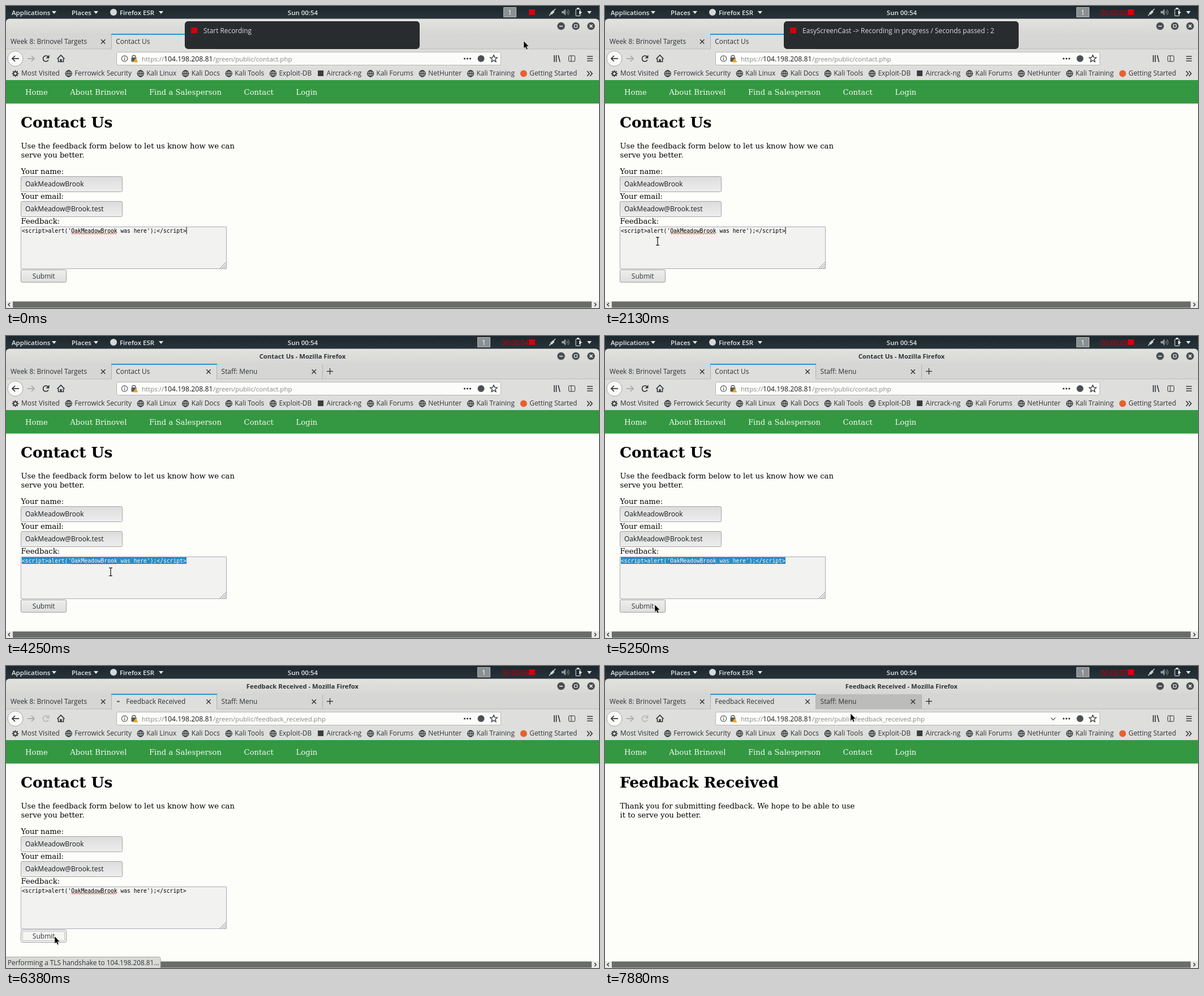
Animation, 1048 px wide and 534 px high, one loop 8000 ms. Source, as an HTML page with a canvas:

```html
<!DOCTYPE html>
<html lang="en">
<head>
<meta charset="utf-8">
<title>Contact form</title>
<style>
html, body { margin: 0; width: 100%; height: 100%; overflow: hidden; background: #fdfdfa; }
canvas { display: block; }
</style>
</head>
<body>
<canvas id="stage" width="1048" height="534"></canvas>
<script>
const c = document.getElementById('stage').getContext('2d');
const W = 1048, H = 534, LOOP = 8000, TICK = 125;
const SANS = '"Open Sans", "Noto Sans", sans-serif';
const SERIF = '"DejaVu Serif", serif';
const MONO = '"DejaVu Sans Mono", monospace';
const INK = '#2e3336', LIGHT = '#e6e9e9', RED = '#d4000c', PALE = '#b4b6b6';
const USER = 'OakMeadowBrook', HOST = '104.198.208.81';

// Ticks of the main events
const SELECT = 24, FADE = 30, CLICK = 44, LOAD = 45, TITLE = 50, DONE = 52, HOVER = 62;

// Pointer stops: tick, x, y
const STOPS = [
  [1, 915, 62], [6, 170, 455], [9, 128, 379], [16, 100, 417], [20, 55, 408], [26, 55, 408],
  [29, 47, 408], [34, 185, 417], [43, 85, 477], [56, 86, 479], [58, 155, 422], [63, 434, 84]
];

const clamp = v => Math.min(1, Math.max(0, v));

// Draws a string and returns its width
function text(s, x, y, { size = 11.9, color = INK, font = SANS, weight = 400, align = 'left' } = {}) {
  c.font = `${weight} ${size}px ${font}`;
  c.fillStyle = color;
  c.textAlign = align;
  c.fillText(s, x, y);
  return c.measureText(s).width;
}

const serif = (s, x, y, color = '#000') => text(s, x, y, { size: 13.2, color, font: SERIF });
const heading = s => text(s, 26, 215, { size: 26.4, color: '#000', font: SERIF, weight: 700 });

function rect(x, y, w, h, fill) {
  c.fillStyle = fill;
  c.fillRect(x, y, w, h);
}

function paint(fill, stroke, width) {
  if (fill) { c.fillStyle = fill; c.fill(); }
  if (stroke) { c.strokeStyle = stroke; c.lineWidth = width; c.stroke(); }
}

function box(x, y, w, h, r, fill, stroke) {
  c.beginPath();
  c.roundRect(x, y, w, h, r);
  paint(fill, stroke, 1);
}

function arc(x, y, r, fill, stroke, width = 1, from = 0, to = Math.PI * 2) {
  c.beginPath();
  c.arc(x, y, r, from, to);
  paint(fill, stroke, width);
}

// Flat x, y lists relative to an anchor
function trace(x, y, p) {
  c.beginPath();
  for (let i = 0; i < p.length; i += 2) c.lineTo(x + p[i], y + p[i + 1]);
}

function line(x, y, p, color = INK, width = 1.6) {
  trace(x, y, p);
  paint(null, color, width);
}

function poly(x, y, p, fill) {
  trace(x, y, p);
  c.closePath();
  paint(fill);
}

function fade(y0, y1, a, b) {
  const g = c.createLinearGradient(0, y0, 0, y1);
  g.addColorStop(0, a);
  g.addColorStop(1, b);
  return g;
}

const triangle = (x, y) => poly(x, y, [-4, -2, 4, -2, 0, 3], LIGHT);
const chevron = (x, y, w, h, color, width) => line(x, y, [-w, -h, w, 0, -w, h], color, width);

function plus(x, y, r, color = INK, width = 1.4) {
  line(x, y, [-r, 0, r, 0], color, width);
  line(x, y, [0, -r, 0, r], color, width);
}

function cross(x, y, r, color = INK, width = 1.4) {
  line(x, y, [-r, -r, r, r], color, width);
  line(x, y, [r, -r, -r, r], color, width);
}

function arrow(x, dir, color) {
  line(x, 93, [-6, 0, 6, 0], color, 1.7);
  chevron(x + 3.5 * dir, 93, 2.5 * dir, 5, color, 1.7);
}

function globe(x, y) {
  arc(x, y, 5.5, null, INK, 1.3);
  c.beginPath();
  c.ellipse(x, y, 2.6, 5.5, 0, 0, Math.PI * 2);
  c.stroke();
  plus(x, y, 5.5, INK, 1);
}

function gear(x, y) {
  plus(x, y, 5.8, INK, 1.8);
  cross(x, y, 4.1, INK, 1.8);
  arc(x, y, 3.2, '#dededc', INK, 1.7);
}

function star(x, y) {
  const p = [];
  for (let i = 0; i <= 10; i++) {
    const a = i * Math.PI / 5 - Math.PI / 2, r = i % 2 ? 3 : 6.6;
    p.push(Math.cos(a) * r, Math.sin(a) * r);
  }
  line(x, y, p, INK, 1.3);
}

function panel(count) {
  rect(0, 0, W, 23, fade(0, 23, '#1c272d', '#28343a'));
  const bar = { size: 11.5, color: LIGHT, weight: 600 };
  text('Applications', 10, 15.5, bar);
  text('Places', 116, 15.5, bar);
  text('Firefox ESR', 201, 15.5, bar);
  text('Sun 00:54', 524.5, 15.5, { ...bar, align: 'center' });
  for (const x of [85, 159, 274, 1031]) triangle(x, 11);
  arc(190, 11, 6, '#d5d9da');

  const x = count ? 833.5 : 879.5;
  box(x, 2.5, 22, 17, 0, '#8b9192', '#b6bbbc');
  text('1', x + 11, 15.5, { color: '#fff', align: 'center' });
  if (count) text('00:00:0' + count, 876, 15.5, { size: 12, color: '#c4000c' });
  rect(924, 6, 11, 10, RED);

  line(965.5, 11, [-5.5, 6, 5.5, -6], '#cfd4d5', 1.6);
  line(965.5, 11, [-2.5, 3, 2.5, -2], '#cfd4d5', 4);
  poly(982, 11, [0, -2, 3, -2, 7, -6, 7, 6, 3, 2, 0, 2], '#8f9799');
  for (const r of [3, 6]) arc(989, 11, r, null, '#7b8487', 1.3, -.9, .9);
  box(1007, 5.5, 8, 12, 1, null, LIGHT);
  rect(1009, 3, 4, 2, LIGHT);
  poly(1013, 11.5, [0, -3.5, 5, 0, 0, 3.5], LIGHT);
}

function tabs(k, name) {
  rect(0, 48, W, 28, '#d6d6d4');
  rect(0, 75.5, W, 1, '#bcbcba');
  rect(187, 50, 185, 27, '#dededc');
  if (k > HOVER) rect(373, 50, 186, 26, '#bcbcba');
  rect(186, 49, 187, 2, '#2a93cf');

  const busy = k >= LOAD && k < DONE;
  if (busy) box(199 + 4 * Math.sin((k - LOAD - 1) * .8), 61.5, 5, 2.5, 1, '#696d6f');
  ['Week 8: Brinovel Targets', name, 'Staff: Menu'].forEach((s, i) => {
    const x = 8 + i * 186.3;
    text(s, x + (busy && i === 1 ? 18 : 0), 67);
    cross(x + 163.7, 63, 3.7);
    rect(Math.round(x) + 178, 51, 1, 25, '#b2b2b0');
  });
  plus(572.5, 62.5, 5.5);
}

function address(k) {
  const reload = k >= LOAD ? PALE : INK, gray = '#858888', dim = '#55595b';
  arc(16.5, 93, 13.5, '#f8f8f7', '#a5a5a4');
  arrow(17, -1, INK);
  arrow(44, 1, '#a5a8a8');
  arc(70.5, 93, 5, null, reload, 1.7, .5, 5.5);
  poly(76.5, 92.5, [0, -6, 0, 0, -6, 0], reload);
  line(97, 93, [-6.5, .5, 0, -6, 6.5, .5]);
  line(97, 93, [-4.5, 0, -4.5, 5.5, 4.5, 5.5, 4.5, 0]);
  rect(95.5, 94, 3, 5, INK);

  box(195.5, 81.5, 679, 23, 3, '#fcfcfa', '#b5b5b4');
  arc(209.5, 93, 5.2, null, dim, 1.2);
  rect(209, 92, 1.2, 4, dim);
  rect(209, 89.5, 1.2, 1.4, dim);
  arc(226, 90.5, 3, null, dim, 1.5, Math.PI, 0);
  rect(221.5, 91, 9, 7.5, dim);
  poly(229, 92, [0, 0, 4.5, 7.5, -4.5, 7.5], '#e9a520');

  const file = k >= TITLE ? 'feedback_received' : 'contact';
  text('https://', 240, 97.5, { size: 11.5, color: gray });
  text(HOST, 279, 97.5, { size: 12.2, color: '#171a1c' });
  text(`/green/public/${file}.php`, 366, 97.5, { size: 11.5, color: gray });
  if (k >= HOVER) line(792, 93.5, [-4, -2, 0, 2, 4, -2], '#666a6b', 1.4);
  for (let i = 0; i < 3; i++) {
    arc(810.5 + i * 5, 93, 1.6, INK);
    rect(1027, 88.4 + i * 4, 10, 1.4, INK);
    line(969 + i * 3.5, 93, [0, -6, i === 2 ? 3 : 0, 6]);
  }
  arc(839.5, 93, 6, '#4c5053');
  star(862, 93.2);
  box(994.5, 88, 11, 10, 1.5, null, INK);
  rect(998.5, 88, 1, 10, INK);
}

function bookmarks() {
  const names = ['Most Visited', 'Ferrowick Security', 'Kali Linux', 'Kali Docs', 'Kali Tools',
    'Exploit-DB', 'Aircrack-ng', 'Kali Forums', 'NetHunter', 'Kali Training', 'Getting Started'];
  let x = 27;
  for (const s of names) {
    const ix = x - 10.5;
    if (s === 'Most Visited') gear(ix, 119.5);
    else if (s === 'Aircrack-ng') rect(ix - 5, 114, 10, 10, '#3a3d40');
    else if (s === 'Getting Started') arc(ix, 119.5, 6, '#e8602c');
    else globe(ix, 119.5);
    x += text(s, x, 123.3) + 26.4;
  }
  for (const x of [1029, 1034]) chevron(x, 119.5, 2, 4.5);
}

function browser(k) {
  const name = k >= TITLE ? 'Feedback Received' : 'Contact Us';
  rect(0, 22, W, 10, '#1f2a2f');
  box(0, 22.5, W, 30, [6, 6, 0, 0], fade(22, 52, '#e2e2df', '#d6d6d4'));
  text(name + ' - Mozilla Firefox', 524, 39.5, { size: 11.3, weight: 700, align: 'center' });
  for (const x of [981, 1007, 1034]) arc(x, 35.5, 6.8, '#4a4e50');
  rect(978, 35, 6, 1.4, '#fff');
  box(1004.5, 33, 5, 5, 0, null, '#fff');
  cross(1034, 35.5, 2.5, '#fff');

  rect(0, 76, W, 55, '#dededc');
  tabs(k, name);
  address(k);
  bookmarks();
}

function feedback(k) {
  const picked = k >= SELECT && k < CLICK;
  box(26.5, 390.5, 363, 74, 0, '#f2f2f0', '#aeabb8');
  if (picked) rect(28, 391, 291, 12, '#2a8dc4');
  text(`<script>alert('${USER} was here');<\/script>`, 28, 400.7,
    { size: 9.67, color: picked ? '#f4f8fa' : '#000', font: MONO });
  const wave = [];
  for (let i = 0; i <= 40; i++) wave.push(i * 2, i % 2 * 1.8);
  line(115.5, 401.3, wave, picked ? '#a03058' : '#e01818', 1);
  if (k < SELECT) rect(318.5, 391, 1, 12, '#000');
  for (const d of [3, 7, 11]) line(389, 464, [-d, 0, 0, -d], '#8c8c8c', 1);
}

function form(k) {
  heading('Contact Us');
  serif('Use the feedback form below to let us know how we can', 26.5, 252);
  serif('serve you better.', 26.5, 268);
  ['Your name:', 'Your email:', 'Feedback:'].forEach((s, i) => serif(s, 26.5, 297 + i * 44));
  [USER, 'OakMeadow@Brook.test'].forEach((s, i) => {
    const y = 301.5 + i * 44;
    box(26.5, y, 179, 27, 2, fade(y, y + 27, '#dcdcdd', '#eeeeed'), '#a5a5aa');
    text(s, 34, y + 17.5, { size: 12, color: '#171a1c' });
  });
  feedback(k);

  const clicked = k >= CLICK;
  box(26.5, 466.5, 80, 22, 2, clicked ? '#f6f6f5' : fade(466, 488, '#efefee', '#dfdfde'), '#9c9c9c');
  if (clicked) {
    c.setLineDash([1, 1]);
    box(29.5, 469.5, 74, 16, 0, null, '#888');
    c.setLineDash([]);
  }
  text('Submit', 66.7, 481.8, { size: 12, align: 'center' });
}

function thanks() {
  heading('Feedback Received');
  serif('Thank you for submitting feedback. We hope to be able to use', 26.5, 252);
  serif('it to serve you better.', 26.5, 268);
}

function page(k) {
  rect(0, 131, W, H - 131, '#fdfdfa');
  rect(0, 131, W, 41.5, '#339841');
  let x = 34;
  for (const s of ['Home', 'About Brinovel', 'Find a Salesperson', 'Contact', 'Login'])
    x += serif(s, x, 157, '#f4faf2') + 39.6;
  k < DONE ? form(k) : thanks();

  rect(0, 522, W, 12, '#e9e9e7');
  rect(12, 522.5, 1023, 11, '#6a6c69');
  chevron(5.5, 528, -1.5, 3, '#222', 1.3);
  chevron(1041.5, 528, 1.5, 3, '#222', 1.3);
  if (k >= LOAD && k < DONE) {
    box(-.5, 514.5, 273.5, 20, [0, 3, 0, 0], '#d9d9d7', '#aaaaa8');
    text(`Performing a TLS handshake to ${HOST}...`, 3, 529, { size: 11.8 });
  }
}

function notice(k, count) {
  c.globalAlpha = clamp(1 - (k - FADE) / 3);
  box(316.5, 27.5, 414, 48, 5, '#292c2e', '#1f2224');
  rect(327, 38, 11, 10, RED);
  const s = count ? 'EasyScreenCast -> Recording in progress / Seconds passed : ' + count : 'Start Recording';
  text(s, 349, 48, { color: '#d9dbdb' });
  c.globalAlpha = 1;
}

function ibeam(x, y) {
  for (const [color, width] of [['#fff', 3], ['#111', 1.3]]) {
    line(x, y, [0, -7, 0, 7], color, width);
    for (const d of [-7, 7]) line(x, y + d, [-3, 0, 3, 0], color, width);
  }
}

function pointer(k) {
  const i = Math.max(1, STOPS.findIndex(s => s[0] >= k));
  const [k0, x0, y0] = STOPS[i - 1], [k1, x1, y1] = STOPS[i];
  const u = clamp((k - k0) / (k1 - k0)), e = u * u * (3 - 2 * u);
  const x = Math.round(x0 + (x1 - x0) * e), y = Math.round(y0 + (y1 - y0) * e);

  if (k < DONE && x > 26 && x < 390 && y > 389 && y < 465) return ibeam(x, y);
  poly(x, y, [0, 0, 0, 13, 2.8, 10.4, 5, 15, 7, 14.1, 5, 9.6, 8.8, 9.2], '#000');
  c.strokeStyle = '#ffffff90';
  c.lineWidth = .8;
  c.stroke();
}

function draw(now) {
  const t = now % LOOP;
  let k = Math.floor(t / TICK);
  if (k % 2 && t < k * TICK + 5) k--;   // odd ticks land on the next 10 ms
  const count = Math.floor((k + .5) / 8.5);
  panel(count);
  browser(k);
  page(k);
  notice(k, count);
  pointer(k);
}

const start = performance.now();
(function loop() {
  draw(performance.now() - start);
  requestAnimationFrame(loop);
})();
</script>
</body>
</html>
```
